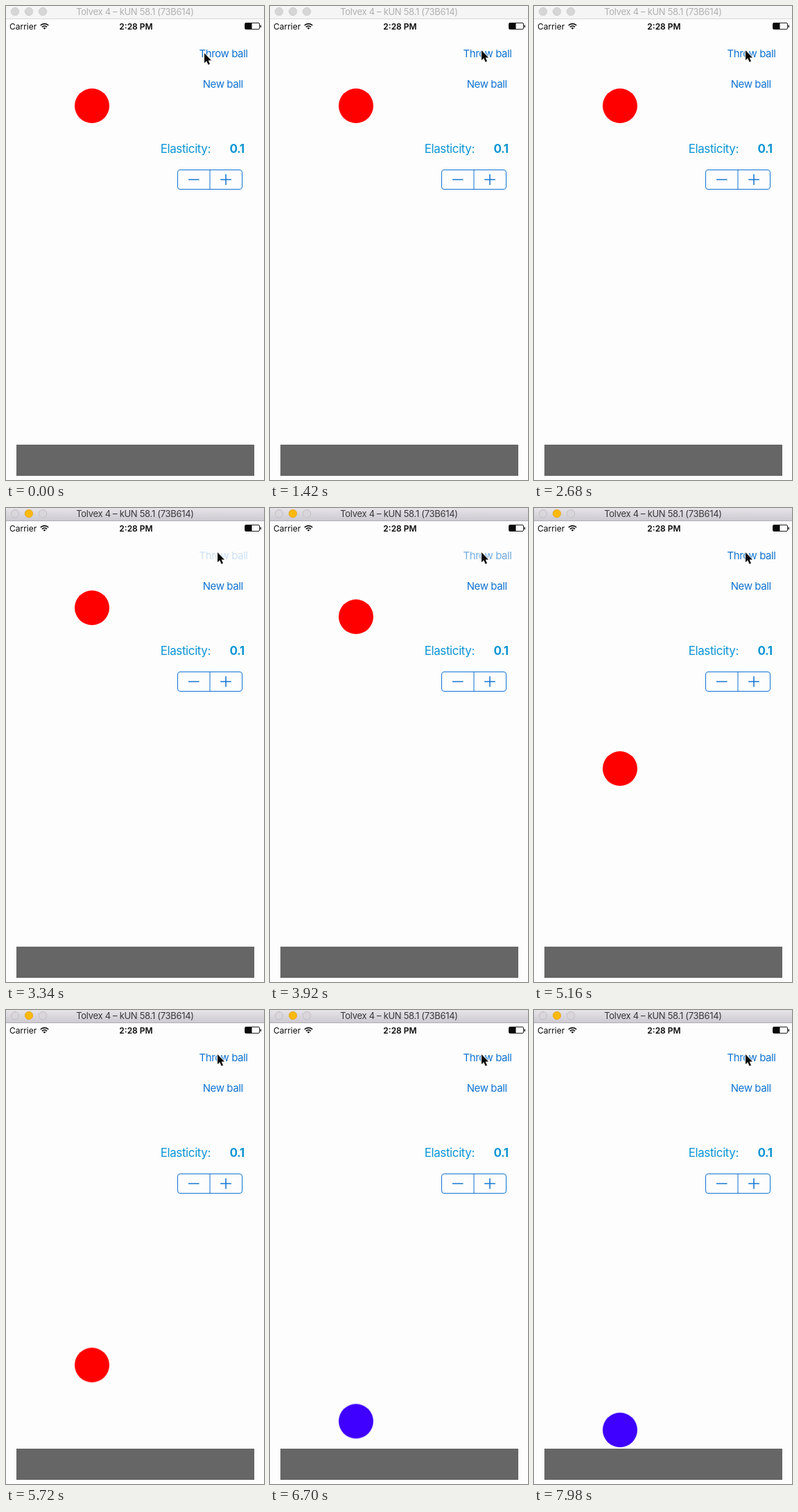
Write an HTML page that moves like this. It is 372 px wide and 684 px high and loops after 8 s.

```html
<!DOCTYPE html>
<html lang="en">
<head>
<meta charset="utf-8">
<title>Bouncing ball</title>
<style>
  html, body { margin: 0; width: 100%; height: 100%; overflow: hidden; background: #fdfdfd; }
  svg { display: block; width: 372px; height: 684px; }
  text { font-family: Inter, Roboto, sans-serif; }
  .middle { text-anchor: middle; }
  .button { font-size: 15px; letter-spacing: -.42px; fill: #1073d0; }
  .label { font-size: 17px; letter-spacing: -.4px; fill: #0c96d6; }
  .status { font-size: 12px; fill: #0a0a0a; }
  .title { font-size: 13px; letter-spacing: -.3px; }
  .stepper { fill: none; stroke: #1073d0; }

  .inactive, .active, #ball, #disc, #throw, #cursor { animation: 8s linear infinite; }
  .inactive { animation-name: deactivate; animation-timing-function: step-end; }
  .active { animation-name: activate; animation-timing-function: step-end; }
  #throw { animation-name: press; }
  #cursor { animation-name: point; }
  #ball { animation-name: drop; }
  #disc { animation-name: recolor; animation-timing-function: step-end; }

  @keyframes deactivate { 0% { opacity: 1; } 39.75%, 100% { opacity: 0; } }
  @keyframes activate { 0% { opacity: 0; } 39.75%, 100% { opacity: 1; } }
  @keyframes press {
    0%, 39.74% { opacity: 1; }
    39.75%, 44.5% { opacity: .2; }
    53.75%, 100% { opacity: 1; }
  }
  @keyframes point {
    0%, 1% { transform: translate(286px, 68px); animation-timing-function: ease-in-out; }
    14%, 100% { transform: translate(305px, 64px); }
  }
  /* Quadratic fall, then one damped bounce */
  @keyframes drop {
    0%, 44.5% { transform: translateY(0); animation-timing-function: cubic-bezier(.333, 0, .667, .333); }
    55.75% { transform: translateY(80px); animation-timing-function: cubic-bezier(.333, .266, .667, .599); }
    61.5% { transform: translateY(183px); animation-timing-function: cubic-bezier(.333, .275, .667, .609); }
    71.5% { transform: translateY(368px); animation-timing-function: cubic-bezier(.333, .314, .667, .648); }
    75.25% { transform: translateY(462px); animation-timing-function: cubic-bezier(.333, .667, .667, 1); }
    81.325% { transform: translateY(447px); animation-timing-function: cubic-bezier(.333, 0, .667, .333); }
    87.375%, 100% { transform: translateY(462px); }
  }
  @keyframes recolor {
    0% { fill: #f00; }
    75.25%, 100% { fill: #3f00ff; }
  }
</style>
</head>
<body>
<svg viewBox="0 0 372 684">
  <defs>
    <linearGradient id="bar" x2="0" y2="1">
      <stop stop-color="#e6e4e8"/>
      <stop offset="1" stop-color="#cdcad1"/>
    </linearGradient>
  </defs>
  <rect width="372" height="684" fill="#fdfdfd"/>

  <g class="inactive">
    <rect width="372" height="18" fill="#f5f5f5"/>
    <rect y="18" width="372" height="1" fill="#d8d8d8"/>
    <g fill="#d6d6d6" stroke="#c4c4c4" stroke-width=".7">
      <circle cx="13" cy="8" r="5.7"/><circle cx="33" cy="8" r="5.7"/><circle cx="53" cy="8" r="5.7"/>
    </g>
    <text class="title middle" x="186" y="13" fill="#b0b0b0">Tolvex 4 – kUN 58.1 (73B614)</text>
  </g>
  <g class="active">
    <rect width="372" height="18" fill="url(#bar)"/>
    <rect y="18" width="372" height="1" fill="#b0aeb4"/>
    <g fill="#d8d6da" stroke="#bebcc2" stroke-width=".8">
      <circle cx="13" cy="8" r="5.7"/><circle cx="53" cy="8" r="5.7"/>
      <circle cx="33" cy="8" r="5.7" fill="#fdb90c" stroke="#e0a21c"/>
    </g>
    <text class="title middle" x="186" y="13" fill="#38373a">Tolvex 4 – kUN 58.1 (73B614)</text>
  </g>

  <text class="status" x="5" y="33.5">Carrier</text>
  <g fill="none" stroke="#0a0a0a" stroke-width="1.7">
    <path d="M49.8 28a8 8 0 0 1 11.4 0M52 30.3a5 5 0 0 1 7 0"/>
    <path d="M53.6 31.8a2.8 2.8 0 0 1 3.8 0L55.5 33.8z" fill="#0a0a0a" stroke="none"/>
  </g>
  <text class="status middle" x="187.5" y="33.5" font-weight="600">2:28 PM</text>
  <rect x="344.5" y="24.5" width="21" height="9" rx="1.5" fill="none" stroke="#222"/>
  <rect x="345" y="25" width="9.5" height="8" fill="#0a0a0a"/>
  <rect x="366.5" y="27.5" width="1.5" height="3.5" fill="#222"/>

  <text id="throw" class="button middle" x="313.5" y="73.5">Throw ball</text>
  <text class="button middle" x="312.7" y="117.5">New ball</text>
  <text class="label" x="222.7" y="211.5">Elasticity:</text>
  <text class="label" x="322.5" y="211.5" font-weight="700">0.1</text>
  <rect class="stepper" x="247.5" y="236.5" width="93" height="28" rx="3.5"/>
  <path class="stepper" d="M294 236.5v28"/>
  <path class="stepper" stroke-width="1.5" d="M263 250.5h15.5M309.2 250.5h15.6M317 242.7v15.6"/>

  <rect x="15" y="633" width="343" height="45" fill="#666"/>
  <g id="ball"><circle id="disc" cx="124" cy="144" r="25"/></g>
  <g id="cursor">
    <path d="M0 0V14.2L3.2 11.2L5.6 16.8L8 15.8L5.6 10.4H10z" fill="#080808" stroke="#fff" stroke-width="1.6" paint-order="stroke"/>
  </g>
</svg>
</body>
</html>
```
